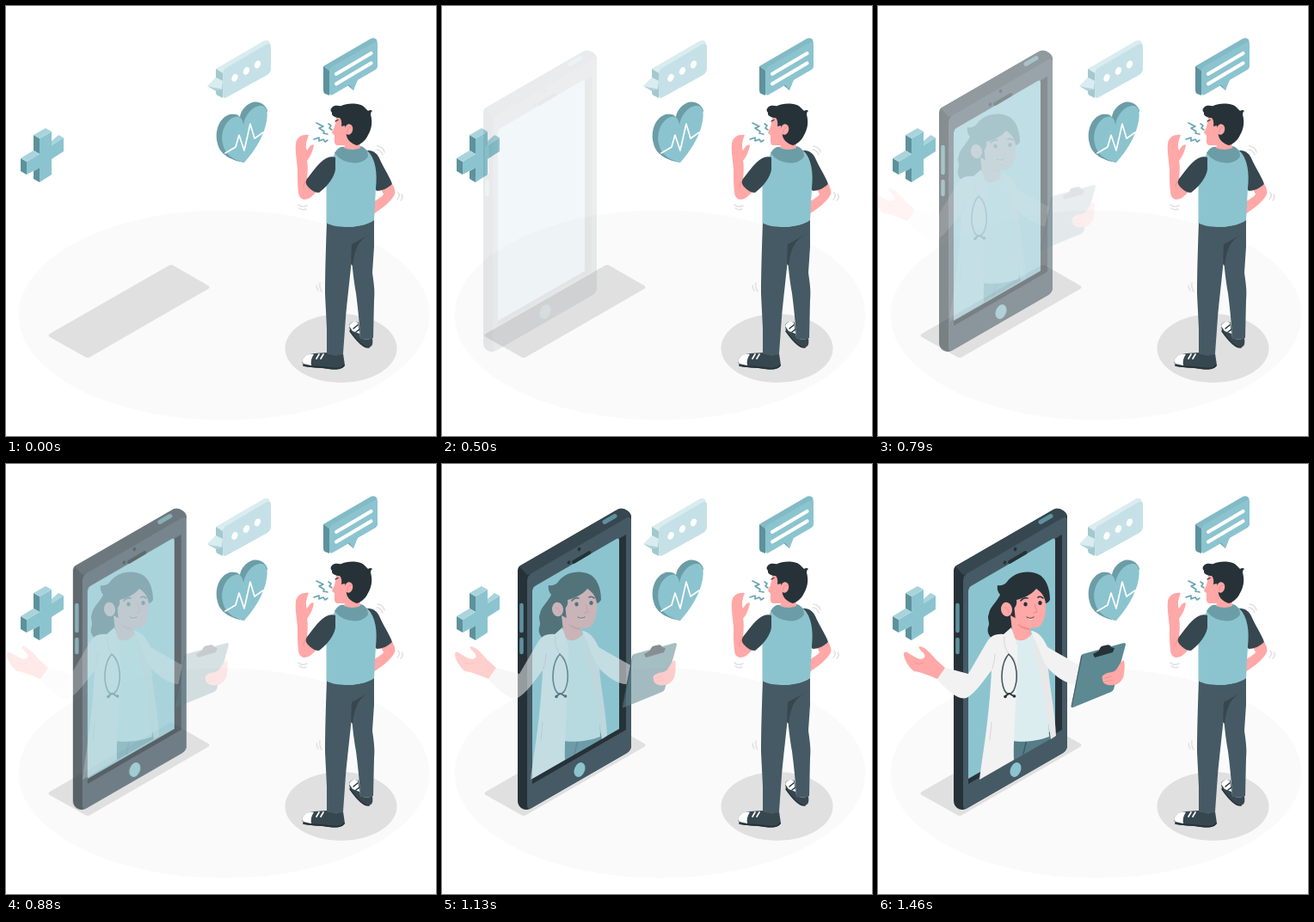
These frames come from a looping animation (500x500 px, 1500 ms). An HTML page with a canvas:

```html
<!DOCTYPE html>
<html lang="en">
<head>
<meta charset="utf-8">
<title>Online doctor</title>
<style>
  html, body { margin: 0; width: 100%; height: 100%; overflow: hidden; background: #fff; }
  canvas { display: block; width: 500px; height: 500px; }
</style>
</head>
<body>
<canvas id="stage" width="500" height="500"></canvas>
<script>
const SIZE = 500, LOOP = 1500, FPS = 24;
const TEAL = '#8bc4cf', TEAL_MID = '#6c9da7', TEAL_DARK = '#5d929d', TEAL_LIGHT = '#a9d4dc';
const PALE = '#c5e1e7', NIGHT = '#263238', SLATE = '#37474f', STEEL = '#455a64';
const SKIN = '#ffa8a7', BLUSH = '#f28f8f', GREY = '#e0e0e0', COAT = '#f2f2f2';

const ctx = document.getElementById('stage').getContext('2d');

// Each layer is painted once, then composited with its own offset and opacity.
function makeLayer(paint) {
  const canvas = document.createElement('canvas');
  canvas.width = canvas.height = SIZE;
  const c = canvas.getContext('2d');
  c.lineCap = c.lineJoin = 'round';
  paint({
    fill(color, d) {
      c.fillStyle = color;
      c.fill(new Path2D(d));
    },
    line(color, width, d) {
      c.strokeStyle = color;
      c.lineWidth = width;
      c.stroke(new Path2D(d));
    },
    oval(color, x, y, rx, ry, turn = 0) {
      c.fillStyle = color;
      c.beginPath();
      c.ellipse(x, y, rx, ry, turn, 0, Math.PI * 2);
      c.fill();
    }
  });
  return canvas;
}

function paintFloor({ fill, oval }) {
  oval('#fafafa', 253.5, 359.5, 239, 122);
  fill(GREY, 'M51 381 L189 302 Q192 300 195 302 L235 325 Q238 327 235 329 L98 408 Q95 410 92 408 L51 385 Q48 383 51 381Z');
  oval(GREY, 389.5, 398, 65, 40);
}

function paintPlus({ fill }) {
  fill(TEAL, 'M39 154 L53 146 V162 L67 153 V169 L53 178 V196 L39 205 V188 L24 196 V181 L39 172Z');
  fill(TEAL_DARK, 'M17 177 L24 181 V196 L17 192Z M32 150 L39 154 V172 L32 168Z M32 192 L39 188 V205 L32 201Z');
  fill(TEAL_LIGHT, 'M32 150 L46 142 L53 146 L39 154Z M17 177 L32 168 L39 172 L24 181Z M53 157 L61 150 L67 153 L53 162Z');
}

function paintBubbles({ fill, line, oval }) {
  fill('#d9ecef', 'M244 73 L299 41 Q303 39 306 41 L308 47 L255 78 L252 78Z');
  fill('#a3c8ce', 'M244 73 L252 78 V107 L246 104 Q244 103 244 100Z');
  fill(PALE, 'M252 79 Q252 75 256 72 L302 45 Q308 42 308 48 V73 Q308 77 304 80 L257 106 Q252 109 252 103Z');
  fill('#d9ecef', 'M234 93 L244 83 L252 87 L251 97Z');
  fill('#b1d2d8', 'M234 93 L251 97 L244 99Z');
  for (const [x, y] of [[266, 83.5], [279.5, 75.5], [292.5, 68]]) oval('#fff', x, y, 3.3, 4.7, 0.4);

  fill('#82bac5', 'M369 70 L424 38 Q428 36 431 39 L432 44 L380 75 L376 75Z');
  fill(TEAL_DARK, 'M369 70 L376 75 V104 L371 102 Q369 101 369 98Z M397 92 L404 98 L407 87Z');
  fill(TEAL, 'M376 77 Q376 73 380 70 L427 43 Q432 40 432 46 V70 Q432 73 428 75 L409 86 L404 98 L399 92 L380 103 Q376 105 376 101Z');
  line('#fff', 4.2, 'M384 79 L424.5 55 M384 90.5 L424.5 66.5');
}

function paintHeart({ fill, line }) {
  fill(TEAL_MID, 'M277 182 C264 180 249 174 246 160 C242 145 248 130 260 126 C266 125 270 126 272 129 C273 120 282 112 289 111.5 C296 111 303 116 304 122Z');
  fill(TEAL, 'M277 182 C264 179 254 172 252 160 C249 146 256 132 266 129 C272 127 275 131 276 138 C278 127 286 117 295 116 C303 115 305 123 303 134 C300 152 288 170 277 182Z');
  line('#fff', 1.7, 'M255 171 L267 164 L271 150 L277 168 L284 137 L289 154 L299 147');
}

function paintMan({ fill, line, oval }) {
  // Right arm, legs and shoes
  fill(SKIN, 'M436 213 L449 207 C452 211 453 217 452 219 C449 226 437 236 427 242 V228 C433 224 438 221 439 219Z');
  fill(SLATE, 'M399 371 C401 367 405 366 410 368 L412 386 C417 388 422 388 426 386 C427 393 426 396 422 397 C416 398 406 387 400 378Z');
  fill('#fff', 'M399 372 C401 367 405 366 409 368 L411 381 L403 378Z');
  line(NIGHT, 1.5, 'M404 375 L409 371 M407 379 L411 376 M400 378 C407 388 416 398 422 397');
  fill(STEEL, 'M373 250 C385 259 415 259 428 248 V280 L426 310 C428 325 429 331 428 342 L427 386 C422 388 415 388 412 386 C411 368 409 350 407 334 C404 317 403 306 402 294 C400 315 397 340 395 362 L392 404 C387 408 378 407 373 403 V375 L371 335 C371 310 372 280 373 250Z');
  fill(SLATE, 'M402 277 L426 264 C412 271 406 278 403 302 L401 300Z');
  fill(SLATE, 'M344 413 C346 406 352 405 358 404 L373 403 C380 407 387 407 392 404 L394 418 C390 423 385 423 375 422 C365 420 352 421 346 418Z');
  fill('#fff', 'M344 413 C346 406 352 404 358 405 C355 409 354 414 355 418 L346 416Z');
  line('#fff', 1.7, 'M361 410 L364 405 M366 410 L369 405');
  line(NIGHT, 1.8, 'M346 418 C352 420 365 419 375 421 C385 422 390 422 393 418');

  // Arms and torso
  fill(SLATE, 'M416 168 C428 167 432 172 435 179 C440 190 447 200 449 207 C444 212 437 215 431 215 L424 205Z');
  fill(SKIN, 'M352 150 C345 149 338 152 337 160 C336 168 338 178 339 190 C339 203 339 214 341 221 C344 227 352 226 358 219 L362 215 L350 203 C351 190 351 184 350 180 C354 175 357 168 358 162 C356 160 353 163 350 168 C348 164 349 157 352 150Z');
  line(BLUSH, 0.8, 'M349 203 Q345 208 346 212');
  fill(TEAL, 'M383 170 C377 182 372 195 372.5 208 L372.5 252 C382 259 415 259 428 249 L430 212 C432 195 430 177 420 168Z');
  fill(SLATE, 'M383 176 C372 172 363 184 350 201 C347 206 350 209 353 212 C356 215 360 217 364 217 C375 209 382 198 383 190Z');
  fill(TEAL_MID, 'M382 171 C386 164 391 163 394 164 C400 167 408 166 412 163 C418 164 421 169 421 175 C417 181 409 184 401 182 C392 181 386 176 382 171Z');

  // Head
  fill(SKIN, 'M392 125 L384 129 C383 138 382 142 379 147 C379 149 382 149 382 151 C382 156 381 161 385 162 L394 162 L393 165 C400 168 408 167 412 165 L411 152 L400 130Z');
  fill(NIGHT, 'M379 118 C383 114 388 117 390 116 C396 113 411 112 417 118 L421 122 Q424 120 426 122 Q424 123 424 126 C427 137 424 145 421 150 C418 157 412 161 408 162 C402 160 397 156 396 151 L394 139 L390 140 Q391 133 388 130 C384 130 378 128 379 124 C377 122 377 120 379 118Z');
  oval(SKIN, 398.5, 143.5, 4.7, 6.2, 0.2);
  line(BLUSH, 1, 'M397 147 Q396 142 401 141');
  line(NIGHT, 1.2, 'M383 134 L386 132.5');

  // Cough and shivers
  line('#64a4b0', 1.6, 'M361 136 L369 140 L364 142 L370 146 L369 148 L374 149 M375 137 L378 139 L376 142 L379 144 M358 155 L364 153 L364 157 L369 155 L371 158 L374 156');
  line(GREY, 1.5, 'M431 167 Q436 167 438 173 M432 163 Q439 164 440 170 M456 217 Q459 221 455 225 M460 219 Q463 222 459 226 M340 231 Q344 235 350 232 M341 235 Q345 238 349 236 M361 325 Q361 328 363 331 M365 322 Q364 327 367 332');
}

function paintPhone({ fill, line, oval }) {
  fill(NIGHT, 'M88 124 Q88 119 93 117 L204 53 Q209 50 215 54 Q220 57 220 62 V327 Q220 333 215 336 L104 400 Q98 404 92 400 Q88 397 88 391Z');
  fill(SLATE, 'M90 119 L204 53 Q209 50 215 54 Q219 56 220 61 L103 128 L99 129Z');
  fill(STEEL, 'M99 136 Q99 130 104 127 L214 63 Q220 60 220 65 V327 Q220 333 215 336 L104 400 Q99 403 99 396Z');
  fill(NIGHT, 'M105 145 L214 82 V309 L105 372Z');
  fill(TEAL, 'M105 147 Q105 144 108 142 L203 87 Q206 85.5 206 89 V308 L105 366Z');
  line(NIGHT, 4, 'M153 114 L171.5 103');
  oval(NIGHT, 147.5, 114.5, 1.7, 2.2, 0.4);
  oval(NIGHT, 159.5, 99, 1.8, 2.3, 0.4);
  oval(TEAL, 160, 355.5, 6, 8.8, 0.4);
  line(TEAL_DARK, 5, 'M189 67.5 L201 60.5');
  line(TEAL_DARK, 4.5, 'M92.5 164 V194 M92.5 204 V219');
}

function paintDoctor({ fill, line, oval }) {
  // Back hair and neck
  fill(NIGHT, 'M143 150 C139 160 130 166 129 174 C126 180 131 184 128 190 C126 198 132 205 141 206 C151 205 160 195 166 188 L164 150Z');
  fill(SKIN, 'M154 176 L176 188 L178 200 C178 207 164 211 157 204Z');
  fill(BLUSH, 'M162 186 L176 189 L176 193 Q167 193 162 186Z');

  // Shirt and trousers
  fill('#547d87', 'M156 320 L199 312 L202 319 L155 346Z');
  line(STEEL, 1.5, 'M173 320 L169 337');
  fill('#dcedf0', 'M156 198 C160 208 172 208 180 196 L188 207 C191 240 198 280 199 317 C187 322 168 324 156 322 L150 230Z');

  // Coat with its right sleeve, then the left sleeve and hand
  fill('#e8e8e8', 'M178 194 C187 195 193 204 197 213 L232 235 C236 239 235 250 229 256 C220 256 206 247 198 238 C200 262 206 290 207 316 L201 320 C197 290 188 240 180 207Z');
  fill(COAT, 'M178 194 C187 195 193 204 197 213 L236 235 L229 256 C219 255 203 245 194 232Z');
  fill(COAT, 'M155 190 L146 198 C135 197 130 201 126 208 L105 244 L79 237 C74 241 70 247 69 251 C80 262 92 275 103 272 C113 267 124 250 132 240 C129 300 122 335 118 367 L158 344 C157 310 163 255 162 211Z');
  line('#d7d7d7', 1, 'M147 201 Q145 212 153 222 Q160 225 160 235 M133 238 Q136 229 136 221 M132 300 L130 321');
  fill(SKIN, 'M78 237 L69 250 C60 246 50 242 42 241 C37 238 33 231 31 226 C29 221 30 217 34 219 C39 222 44 226 50 227 C54 226 56 224 53 220 C48 215 46 212 49 212 C56 214 62 221 68 228Z');
  line(BLUSH, 0.8, 'M42 231 Q48 234 53 231');

  // Stethoscope
  line(STEEL, 1.6, 'M152 221 C143 231 142 252 147 263 Q152 272 158 263 C163 252 163 231 152 221');
  line(NIGHT, 1.8, 'M152 267 L148 270 M153 267 L158 270');
  oval(NIGHT, 148, 270.5, 1.8, 1.8);
  oval(NIGHT, 158.5, 270, 1.8, 1.8);

  // Head
  fill(SKIN, 'M157 153 C165 142 180 139 188 143 C193 148 196 156 195 164 C195 178 192 188 185 190 C176 192 166 190 160 182Z');
  fill(NIGHT, 'M158 168 C155 160 148 160 144 164 L143 153 C140 150 138 146 139 141 C142 142 147 141 150 137 C158 125 176 123 186 128 C195 132 200 144 200 158 C198 161 196 162 195 162 C194 154 190 149 184 145 C178 153 166 157 161 158 C162 163 160 166 158 168Z');
  oval(SKIN, 149.5, 169, 6.5, 8.3, -0.15);
  line(BLUSH, 1, 'M147 167 Q152 167 152 173');
  oval(NIGHT, 171.5, 163, 2.2, 2.5);
  oval(NIGHT, 188.5, 161.5, 2.2, 2.5);
  line(NIGHT, 1.6, 'M166 159 Q169 155 174 156 M186 155 Q189 153 192 156');
  line(BLUSH, 1.3, 'M182 163 L185 172 L181 173');
  line(NIGHT, 1, 'M173 178 Q177 181 181 178');
  fill('#fff', 'M174 179 Q178 181 180 179 Q178 183 174 179Z');

  // Clipboard and right hand
  fill('#5d8992', 'M238 221 L286 208 Q288 208 288 210 L274 262 Q273 264 271 265 L227 283 Q224 284 225 281 L236 223Z');
  line(STEEL, 1, 'M237 223 L225 282');
  fill(NIGHT, 'M250 221 L257 217 Q258 211 264 211 Q270 209 271 213 L275 214 L273 219 L252 225Z');
  fill(SKIN, 'M286 228 C279 231 280 240 272 242 C264 243 259 246 261 250 C261 256 267 258 274 257 C281 256 286 250 286 243 C287 238 287 232 286 228Z');
  line(BLUSH, 0.8, 'M263 249 L272 247 M264 253 L273 251');
}

const scenery = makeLayer(pen => {
  [paintFloor, paintPlus, paintBubbles, paintHeart, paintMan].forEach(paint => paint(pen));
});

// Keys are [time in ms, horizontal offset, opacity].
const actors = [
  { image: makeLayer(paintPhone),
    keys: [[250, -44.5, 0], [500, -40, 0.1], [625, -31, 0.3], [792, -17, 0.55], [1000, 0, 1]] },
  { image: makeLayer(paintDoctor),
    keys: [[500, -47, 0], [625, -45.5, 0.02], [792, -35, 0.14], [1000, -20, 0.42], [1250, -10, 0.68], [1458, 0, 1]] }
];

function poseAt(keys, time) {
  const next = keys.findIndex(([t]) => time < t);
  if (next <= 0) return (next < 0 ? keys[keys.length - 1] : keys[0]).slice(1);
  const from = keys[next - 1], to = keys[next];
  const u = (time - from[0]) / (to[0] - from[0]);
  return [1, 2].map(i => from[i] + (to[i] - from[i]) * u);
}

function render(time) {
  const step = Math.floor((time % LOOP) * FPS / 1000 + 0.1);
  const now = step % (LOOP * FPS / 1000) * 1000 / FPS;
  ctx.globalAlpha = 1;
  ctx.fillStyle = '#fff';
  ctx.fillRect(0, 0, SIZE, SIZE);
  ctx.drawImage(scenery, 0, 0);
  for (const { image, keys } of actors) {
    const [x, alpha] = poseAt(keys, now);
    ctx.globalAlpha = alpha;
    ctx.drawImage(image, x, 0);
  }
}

const start = performance.now();
function tick() {
  render(performance.now() - start);
  requestAnimationFrame(tick);
}
tick();
</script>
</body>
</html>
```
